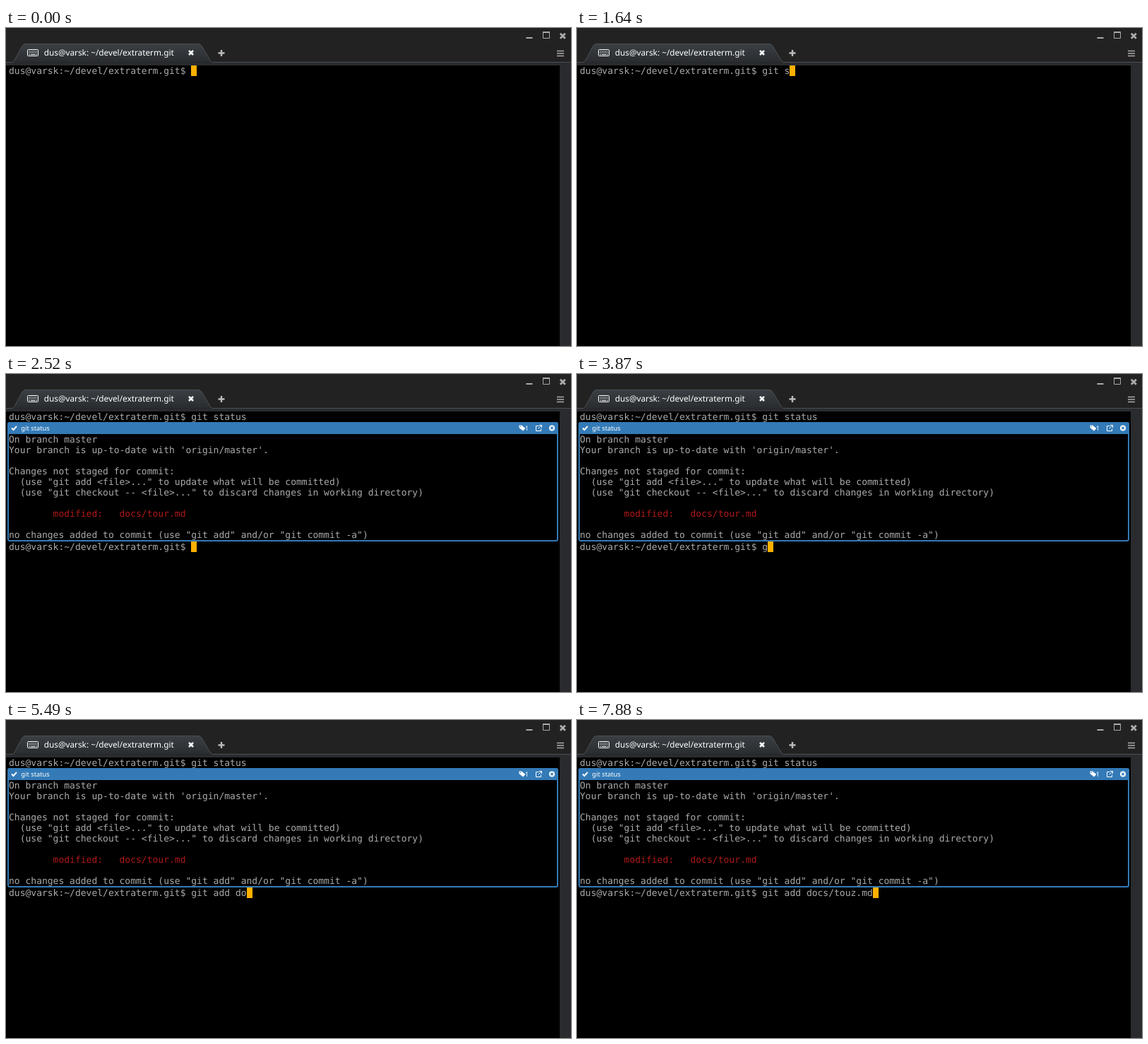
Write an HTML page that moves like this. It is 800x450 px and loops after 8 s.

```html
<!DOCTYPE html>
<html lang="en">
<head>
<meta charset="utf-8">
<title>Terminal</title>
<style>
  html, body { margin: 0; width: 100%; height: 100%; overflow: hidden; background: #222; }
  svg { display: block; width: 800px; height: 450px; }
  text { white-space: pre; text-rendering: geometricPrecision; }
  .term { font: 13px "DejaVu Sans Mono", monospace; fill: #aaa; }
  .ui { font-family: "Noto Sans", "Open Sans", sans-serif; fill: #fff; }
  .line { fill: none; stroke: #fff; }
</style>
</head>
<body>
<svg viewBox="0 0 800 450">
  <defs>
    <linearGradient id="tabFill" x1="0" y1="0" x2="0" y2="1">
      <stop offset="0" stop-color="#3a3f44"/>
      <stop offset="1" stop-color="#292c2f"/>
    </linearGradient>
  </defs>

  <!-- window chrome -->
  <rect width="800" height="450" fill="#222"/>
  <rect y="49" width="800" height="401" fill="#292b2e"/>
  <rect y="53" width="784" height="397" fill="#000"/>
  <path d="M0 48.5H9Q11 48 12.500 45L22.500 26Q24.500 22.500 28 22.500H272Q275.500 22.500 277.500 26L288.500 45Q290 48 292 48.500H800" fill="url(#tabFill)" stroke="#4b4f53"/>

  <!-- tab -->
  <rect class="line" x="30.500" y="30.500" width="15" height="9" rx="1"/>
  <path class="line" d="M32.500 33H44M32.500 35H44" stroke-dasharray="1 1"/>
  <path class="line" d="M32.500 37.500H34M35 37.500H41.500M42.500 37.500H44"/>
  <text class="ui" x="53.700" y="39" font-size="11.800">dus@varsk: ~/devel/extraterm.git</text>
  <path class="line" d="M259 32L265 38M265 32L259 38" stroke-width="2.500"/>
  <path class="line" d="M300.500 35.500H309.500M305 31V40" style="stroke:#bbb" stroke-width="2.400"/>

  <!-- window buttons -->
  <g class="line" style="stroke:#aaa">
    <path d="M736.500 14H745.500" stroke-width="2"/>
    <path d="M760.500 6V14.500H769.500V6M760 6H770" stroke-width="1"/>
    <path d="M760 6H770" stroke-width="2"/>
    <path d="M784.800 7.800L791.800 14.800M791.800 7.800L784.800 14.800" stroke-width="2.800"/>
    <path d="M780 32.500H790M780 36H790M780 39.500H790" stroke-width="1.700"/>
  </g>

  <text class="term" id="first" x="4" y="65"></text>

  <g id="result">
    <rect x="3" y="69" width="778" height="167" rx="2.500" fill="#000" stroke="#337ab7" stroke-width="2"/>
    <path d="M2 85V71Q2 68 5 68H779Q782 68 782 71V85Z" fill="#337ab7"/>
    <path class="line" d="M8 76.500L10.500 79L15 74" stroke-width="2"/>
    <text class="ui" x="21.300" y="80" font-size="9.300">git status</text>
    <path d="M726.500 72.500H730L735.500 77L732 80.500L726.500 76Z" fill="#fff"/>
    <circle cx="728.300" cy="74.200" r=".8" fill="#337ab7"/>
    <text class="ui" x="734.700" y="80" font-size="9.300">1</text>
    <path class="line" d="M754.500 73.500H750.500V80.500H757.500V77.500M753.500 77.500L758 73M755 72.500H758.500V76"/>
    <circle cx="773" cy="76.500" r="4" fill="#fff"/>
    <path d="M771.300 74.800L774.700 78.200M774.700 74.800L771.300 78.200" stroke="#337ab7" stroke-width="1.400"/>
    <g id="output"></g>
    <text class="term" id="second" x="4" y="249"></text>
  </g>

  <rect id="cursor" width="8" height="15" fill="#ffb000"/>
</svg>

<script>
  const LOOP = 8000, OUTPUT_AT = 2520, CELL = 7.826;
  const PROMPT = "dus@varsk:~/devel/extraterm.git$ ";
  const OUTPUT = [
    "On branch master",
    "Your branch is up-to-date with 'origin/master'.",
    "",
    "Changes not staged for commit:",
    '  (use "git add <file>..." to update what will be committed)',
    '  (use "git checkout -- <file>..." to discard changes in working directory)',
    "",
    "        modified:   docs/tour.md",
    "",
    'no changes added to commit (use "git add" and/or "git commit -a")'
  ];

  // keys: [time in ms, characters typed so far]
  const first = {
    text: "git status", top: 53, node: document.getElementById("first"),
    keys: [[1050, 1], [1200, 2], [1350, 3], [1490, 4], [1640, 5], [1790, 6],
           [1930, 8], [2230, 9], [2380, 10]]
  };
  const second = {
    text: "git add docs/touz.md", top: 237, node: document.getElementById("second"),
    keys: [[3870, 1], [4020, 3], [4160, 4], [4310, 5], [4450, 6], [4750, 8],
           [5490, 10], [5640, 11], [5790, 12], [5940, 13],
           [6840, 14], [6990, 15], [7140, 16], [7290, 17],
           [7580, 18], [7730, 19], [7880, 20]]
  };

  const result = document.getElementById("result");
  const cursor = document.getElementById("cursor");

  OUTPUT.forEach((text, row) => {
    const node = document.createElementNS(result.namespaceURI, "text");
    node.setAttribute("class", "term");
    node.setAttribute("x", 4);
    node.setAttribute("y", 97 + row * 15);
    if (text.includes("modified:")) node.style.fill = "#b01818";
    node.textContent = text;
    document.getElementById("output").append(node);
  });

  function typeCommand(command, time) {
    const count = command.keys.reduce((n, [at, typed]) => time >= at ? typed : n, 0);
    command.node.textContent = PROMPT + command.text.slice(0, count);
    return count;
  }

  function draw(time) {
    const done = time >= OUTPUT_AT;
    const counts = [typeCommand(first, time), typeCommand(second, time)];
    result.style.display = done ? "" : "none";
    cursor.setAttribute("x", Math.round(4 + (PROMPT.length + counts[+done]) * CELL));
    cursor.setAttribute("y", (done ? second : first).top);
  }

  const start = performance.now();
  function tick() {
    draw((performance.now() - start) % LOOP);
    requestAnimationFrame(tick);
  }
  tick();
</script>
</body>
</html>
```
